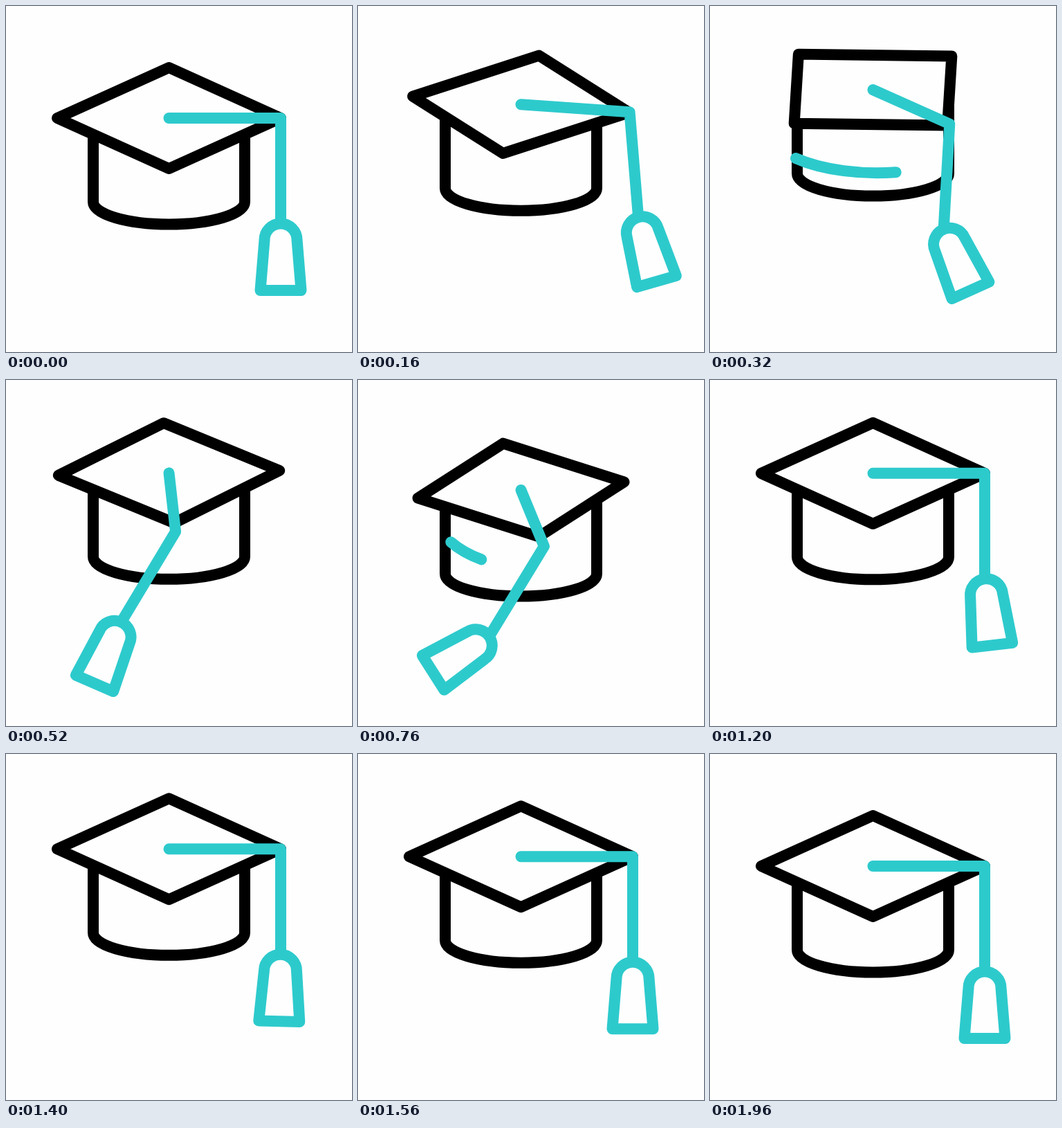
Recreate the animation shown at these times as an HTML page. Size 500 by 500 pixels, loop 2000 ms.

```html
<!DOCTYPE html>
<html lang="en">
<head>
<meta charset="utf-8">
<title>Graduation cap</title>
<style>
  html, body { margin: 0; width: 100%; height: 100%; overflow: hidden; background: #fefefe; }
  svg { display: block; width: 100%; height: 100%; }
  path { fill: none; stroke: #000; stroke-width: 16; stroke-linecap: round; stroke-linejoin: round; }
  .accent { stroke: #2dcacc; }
  #board { fill: #fefefe; }
</style>
</head>
<body>
<svg viewBox="0 0 500 500">
  <g id="cap">
    <path d="M126 156V283C126 301 175 315.5 235.5 315.5S345 301 345 283V156"/>
    <path id="board"/>
    <path id="sweepLeft" class="accent" pathLength="1" d="M346 262C300 288 190 290 124 261"/>
    <path id="sweepRight" class="accent" pathLength="1" d="M126 229C160 268 250 292 345 268"/>
    <path id="cord" class="accent"/>
    <path id="tassel" class="accent" d="M-29.5 95L-23.5 22A23.5 23.5 0 0 1 23.5 22L29.5 95Z"/>
  </g>
</svg>
<script>
const LOOP = 2000, CX = 235.5, CY = 162, RX = 161.5, RY = 73, CORD = 154;
const RAD = Math.PI / 180;
const el = id => document.getElementById(id);

const span = (t, from, to) => Math.min(1, Math.max(0, (t - from) / (to - from)));
const ease = u => (1 - Math.cos(Math.PI * u)) / 2;
const glide = (t, from, to) => ease(span(t, from, to));

// Eases through turning points given as [time, value], starting from rest.
function sway(t, ...points) {
  let time = 0, value = 0;
  for (const [nextTime, nextValue] of points) {
    value += (nextValue - value) * glide(t, time, nextTime);
    time = nextTime;
  }
  return value;
}

// A float up, a second float, then a fall that dips and recovers.
function lift(t) {
  const height = sway(t, [330, -41], [810, -2], [1280, -29]);
  return height + 34 * span(t, 1280, 1760) ** 1.5 - 5 * span(t, 1760, 1800);
}

function corner(deg, size) {
  return [CX + RX * size * Math.cos(deg * RAD), CY + RY * size * Math.sin(deg * RAD)];
}

function trim(path, tail, head) {
  const length = Math.max(0, head - tail);
  path.style.display = length > 0.002 ? "" : "none";
  path.setAttribute("stroke-dasharray", `${length} 3`);
  path.setAttribute("stroke-dashoffset", -tail);
}

function draw(t) {
  el("cap").setAttribute("transform", `translate(0 ${lift(t)})`);

  // A quarter turn out and back, shrinking a little on the way.
  const out = span(t, 50, 580), back = span(t, 580, 1200);
  const angle = 90 * (ease(out) - ease(back ** 1.25));
  const size = 1 - 0.03 * Math.sin(Math.PI * out) - 0.08 * Math.sin(Math.PI * back);
  el("board").setAttribute("d",
    "M" + [0, 90, 180, 270].map(a => corner(angle + a, size)).join("L") + "Z");

  // The cord hangs further over the edge when it faces the viewer.
  const twist = Math.sin(2 * angle * RAD);
  const reach = 1 - 0.05 * twist + 0.17 * Math.sin(angle * RAD) ** 8;
  const [x, y] = corner(angle - 2 * twist, reach);

  // Swings are in degrees from straight down, positive to the right.
  const cordSwing = RAD * sway(t, [190, 5], [650, -39], [1060, 6], [1200, 0]);
  const tasselSwing = sway(t, [280, 26], [720, -60], [1090, 23], [1290, -5], [1460, 0]);
  const along = d => [x + d * Math.sin(cordSwing), y + d * Math.cos(cordSwing)];
  el("cord").setAttribute("d", `M${CX} ${CY}L${x} ${y}L${along(CORD - 5)}`);
  el("tassel").setAttribute("transform", `translate(${along(CORD)}) rotate(${-tasselSwing})`);

  trim(el("sweepLeft"), glide(t, 240, 440), glide(t, 180, 320));
  trim(el("sweepRight"), glide(t, 697, 1140), glide(t, 612, 1040));
}

const start = performance.now();
function frame(now) {
  draw(Math.max(0, now - start) % LOOP);
  requestAnimationFrame(frame);
}
draw(0);
requestAnimationFrame(frame);
</script>
</body>
</html>
```
